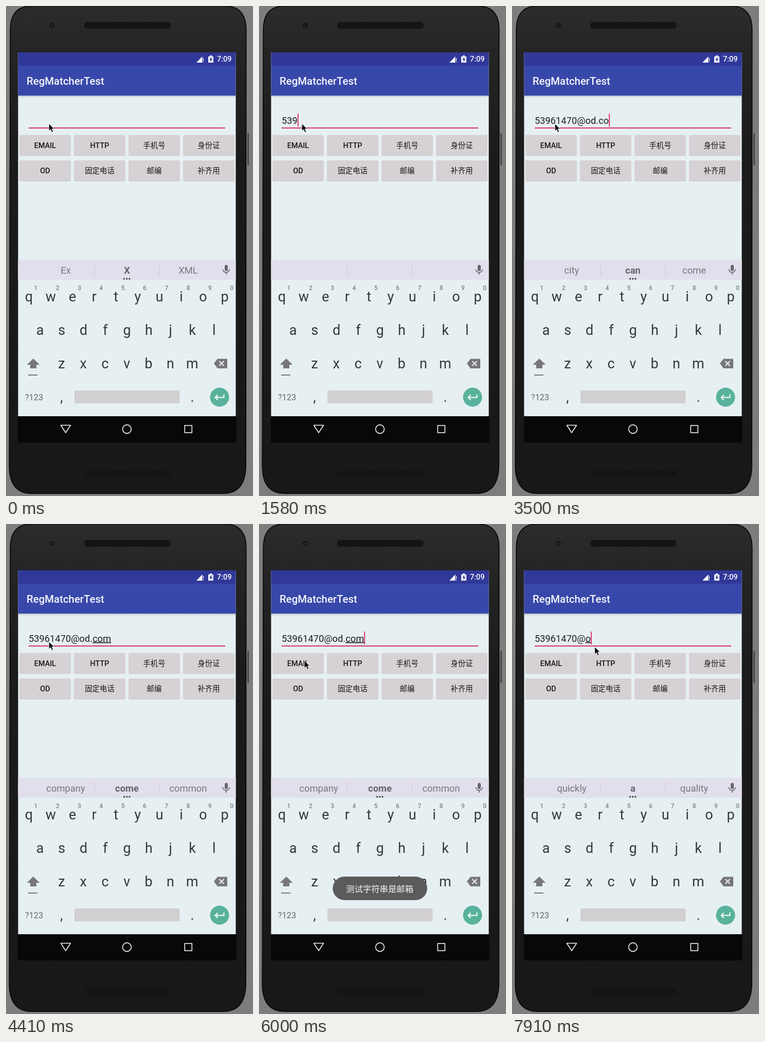
These frames come from a looping animation (480x952 px, 7.99 s). An HTML page:

```html
<!DOCTYPE html>
<html lang="zh-CN">
<head>
<meta charset="utf-8">
<style>
  html, body { margin: 0; width: 100%; height: 100%; overflow: hidden; background: #7d7d7d; }
  svg { display: block; width: 480px; height: 952px; }
  text { font-family: Roboto, "Noto Sans CJK SC", "Noto Sans CJK", sans-serif; white-space: pre; }
  .mid { text-anchor: middle; }
  .btn { font-size: 14.4px; font-weight: 500; fill: #171717; }
  .key { font-size: 27px; fill: #35373b; }
  .hint { font-size: 12px; font-weight: 500; fill: #808287; }
  .word { font-size: 18.4px; fill: #77767e; }
  .line { fill: none; stroke: #f4f4f4; stroke-width: 1.6; }
  #word { text-decoration: underline; text-decoration-thickness: 1px; text-decoration-skip-ink: none; }
</style>
</head>
<body>
<svg viewBox="0 0 480 952">
  <defs>
    <linearGradient id="body" x2="0" y2="1">
      <stop offset="0" stop-color="#2c2c2d"/><stop offset=".09" stop-color="#252526"/>
      <stop offset=".3" stop-color="#1b1b1b"/><stop offset="1" stop-color="#181818"/>
    </linearGradient>
    <linearGradient id="shade" x2="0" y2="1">
      <stop offset="0" stop-color="#8c8c98" stop-opacity=".5"/><stop offset="1" stop-color="#8c8c98" stop-opacity="0"/>
    </linearGradient>
    <pattern id="mesh" width="4" height="4" patternUnits="userSpaceOnUse">
      <rect width="4" height="4" fill="#0f0f0f"/><circle cx="1" cy="1" r=".7" fill="#292929"/><circle cx="3" cy="3" r=".7" fill="#292929"/>
    </pattern>
  </defs>

  <!-- phone -->
  <rect x="469.5" y="247" width="2" height="62" fill="#303030"/>
  <path d="M8.5 46C8.5 16 22 0 50 0H425C453 0 466.5 16 466.5 46L466 895C465 931 450 947 422 947H50C22 947 7 931 6.5 895Z"
    fill="url(#body)" stroke="#0c0c0c" stroke-width="2"/>
  <circle cx="90" cy="38" r="5" fill="#151518"/><circle cx="90" cy="38" r="2" fill="#29293a"/>
  <rect x="152" y="31" width="168" height="13" rx="6" fill="url(#mesh)"/>
  <rect x="152" y="902" width="168" height="13" rx="6" fill="url(#mesh)"/>

  <!-- screen -->
  <rect x="23.5" y="90" width="423" height="758" fill="#e6f0f3"/>
  <rect x="23.5" y="90" width="423" height="27" fill="#303899"/>
  <rect x="23.5" y="116" width="423" height="58" fill="#3848aa"/>
  <rect x="23.5" y="174" width="423" height="4" fill="url(#shade)"/>
  <text x="40" y="153" font-size="20.4" font-weight="500" fill="#f5f6fb">RegMatcherTest</text>
  <path d="M370 110 381.5 98V110Z" fill="#fff"/>
  <path d="M383.5 101V107M383.5 108.5V110" stroke="#fff" stroke-width="1.2"/>
  <path d="M393 98H396V96H400V98H403V110H393Z" fill="#fff"/>
  <path d="M399 98.5 395.3 104.5H397.6V109L401 103H399Z" fill="#303899"/>
  <text x="410" y="108" font-size="14.5" font-weight="500" fill="#fff">7:09</text>

  <text x="44" y="228.5" font-size="18.3" fill="#1c1e20" id="field"><tspan id="head"></tspan><tspan id="word"></tspan></text>
  <rect x="44" y="236" width="382" height="2" fill="#d6346c"/>
  <rect id="caret" y="209" width="2" height="25" fill="#dc386f"/>
  <g id="buttons"></g>

  <!-- keyboard -->
  <rect x="23.5" y="493" width="423" height="39" fill="#e2dfec"/>
  <path d="M172 501V526M298 501V526" stroke="#cbc9d4"/>
  <g id="hints">
    <text class="word mid" x="116" y="520"></text>
    <text class="word mid" x="235" y="520" font-weight="700" style="fill:#66656d"></text>
    <text class="word mid" x="354" y="520"></text>
  </g>
  <g id="dots" fill="#444"><circle cx="229.5" cy="530" r="1.7"/><circle cx="234.8" cy="530" r="1.7"/><circle cx="240" cy="530" r="1.7"/></g>
  <rect x="425" y="503" width="6" height="12" rx="3" fill="#66666c"/>
  <path d="M421.5 511.5a6.3 6.3 0 0 0 12.6 0M427.8 518V522" fill="none" stroke="#66666c" stroke-width="1.7"/>
  <g id="keys"></g>
  <path d="M53 685 65.5 697H59V704H47V697H40.5Z" fill="#77777a"/>
  <rect x="43" y="716" width="18" height="2" fill="#77777a"/>
  <path d="M404 694.5 411 685.5H430V704H411Z" fill="#77777a"/>
  <path d="M414.5 690 423.5 699M423.5 690 414.5 699" stroke="#f0f4f6" stroke-width="2"/>
  <text x="37" y="766" font-size="16.3" fill="#65676b">?123</text>
  <rect x="133" y="747" width="204.5" height="25" rx="3" fill="#d2cfd1"/>
  <circle cx="415" cy="760" r="18.5" fill="#59b29b"/>
  <path d="M423.5 754.5V760.5H407M411.5 755.5 406.5 760.5 411.5 765.5" fill="none" stroke="#fff" stroke-width="2"/>

  <!-- navigation -->
  <rect x="23" y="797" width="424.5" height="51" fill="#08080b"/>
  <path class="line" d="M106.5 814.5H125.5L116 829Z" stroke-linejoin="round"/>
  <circle class="line" cx="235" cy="822" r="8.4"/>
  <rect class="line" x="347.3" y="815" width="14" height="14"/>

  <g id="toast">
    <rect x="143.3" y="685" width="183.5" height="45.7" rx="22.8" fill="#5b5b5b"/>
    <text class="mid" x="234.6" y="714.5" font-size="16.4" fill="#f4f4f4">测试字符串是邮箱</text>
  </g>
  <path id="mouse" d="M0 0V14.5L3.4 11.5 6 17 8.6 15.8 6.1 10.4H10.5Z" fill="#0a0a0a" stroke="#fff" stroke-width=".9"/>
</svg>
<script>
const LOOP = 7990, MAIL = '53961470@od.com';
const $ = id => document.getElementById(id);
const label = (cls, x, y, s) => `<text class="${cls} mid" x="${x}" y="${y}">${s}</text>`;

$('buttons').innerHTML = ['EMAIL', 'HTTP', '手机号', '身份证', 'OD', '固定电话', '邮编', '补齐用'].map((s, i) => {
  const x = 26 + i % 4 * 106, y = i < 4 ? 250.5 : 300;
  return `<rect x="${x}" y="${y + .8}" width="100" height="40" rx="3" fill="#c9c8cf"/>
    <rect x="${x}" y="${y}" width="100" height="40" rx="3" fill="#d6d1d4"/>` + label('btn', x + 50, y + 25.2, s);
}).join('');

const row = (s, x, y) => [...s].map((c, i) => label('key', x + i * 42.3, y, c)).join('');
$('keys').innerHTML = row('qwertyuiop', 44.5, 574) + row('asdfghjkl', 66, 639) + row('zxcvbnm', 108, 704) +
  label('key', 108, 769, ',') + label('key', 362, 769, '.') +
  [...'1234567890'].map((c, i) => label('hint', 58 + i * 42.3, 551.5, c)).join('');

// [time, characters in the field]
const typing = [[0, 0], [1000, 1], [1250, 2], [1500, 3], [1740, 4], [1910, 5], [2080, 6], [2240, 7], [2490, 8],
  [2660, 9], [2830, 10], [3000, 11], [3160, 12], [3330, 13], [3490, 14], [3700, 15],
  [6740, 14], [6910, 13], [7160, 12], [7490, 11], [7740, 10]];
// [time, suggestions]
const hints = [[0, 'Ex X XML'], [1000, ''], [2900, 'quickly a quality'], [3160, ''], [3410, 'city can come'],
  [3750, 'company come common'], [6740, 'city can come'], [6910, 'of come to'], [7160, ''], [7740, 'quickly a quality']];

const at = (list, t) => list.filter(e => e[0] <= t).pop();
const ramp = (t, a, b) => Math.min(1, Math.max(0, (t - a) / (b - a)));
const ease = u => u * u * (3 - 2 * u);

function draw(t) {
  const [since, count] = at(typing, t), text = MAIL.slice(0, count);
  const cut = t < 3700 ? count : text.search(/[a-z]*$/);
  $('head').textContent = text.slice(0, cut);
  $('word').textContent = text.slice(cut);
  $('caret').setAttribute('x', 44 + (count ? $('field').getComputedTextLength() : 0));
  const lit = (t - since) % 1000 < 500;
  $('caret').style.opacity = (count ? lit : !lit) ? 1 : 0;

  const words = at(hints, t)[1].split(' ');
  [...$('hints').children].forEach((el, i) => el.textContent = words[i] || '');
  $('dots').style.opacity = words[0] ? 1 : 0;

  $('toast').style.opacity = ease(ramp(t, 5040, 5480)) * (1 - ease(ramp(t, 7080, 7410)));

  const down = ease(ramp(t, 4410, 4830)), away = ease(ramp(t, 6160, 6580));
  $('mouse').setAttribute('transform', `translate(${83.2 + 5 * down + 72.5 * away} ${228.5 + 37 * down - 27 * away})`);
}

function tick(now) {
  draw(now % LOOP);
  requestAnimationFrame(tick);
}
draw(0);
requestAnimationFrame(tick);
</script>
</body>
</html>
```
